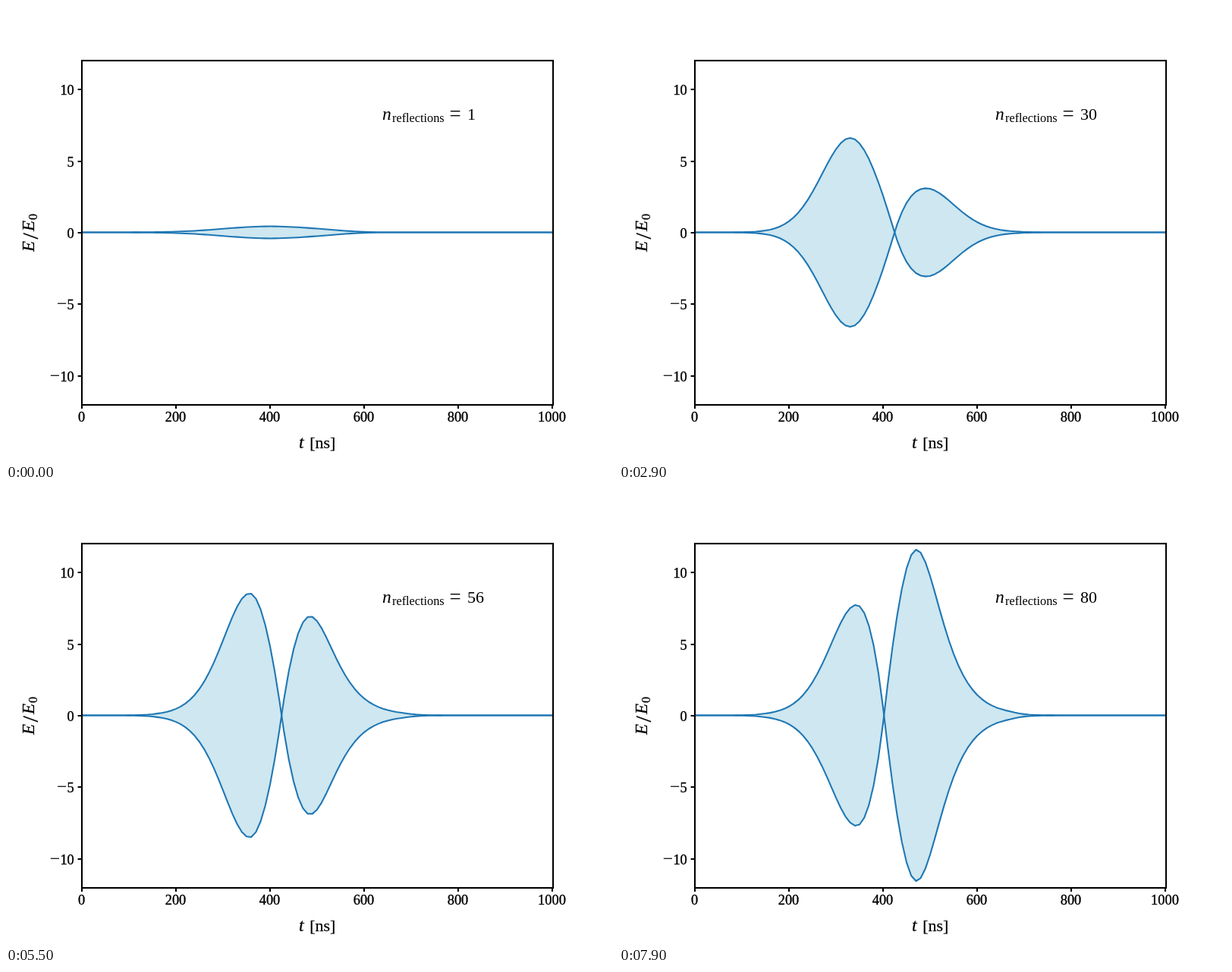
Animation, 800 px wide and 600 px high, one loop 8 s. Source, as an HTML page:

```html
<!DOCTYPE html>
<html lang="en">
<head>
<meta charset="utf-8">
<title>Pulse envelope by reflection</title>
<style>
  html, body { margin: 0; width: 100%; height: 100%; overflow: hidden; background: #fff; }
  svg { display: block; width: 800px; height: 600px; }
  text { font-family: "Liberation Serif", "Times New Roman", serif; font-size: 22px; fill: #000; }
  .tick { font-size: 18.4px; stroke: #000; stroke-width: .35px; }
  .label { stroke: #000; stroke-width: .25px; }
  .it { font-style: italic; }
  .curve { fill: none; stroke: #1f77b4; stroke-width: 2.08; stroke-linejoin: round; }
  .axis { fill: none; stroke: #000; stroke-width: 2.1; }
</style>
</head>
<body>
<svg viewBox="0 0 800 600">
  <path id="area" fill="#add8e6" fill-opacity=".6"/>
  <path id="upper" class="curve"/>
  <path id="lower" class="curve"/>
  <path id="ticks" class="axis"/>
  <rect class="axis" x="100" y="72" width="621" height="454"/>
  <g id="tickLabels"></g>
  <text class="label" y="582.6"><tspan class="it" x="386" font-size="24">t</tspan><tspan x="400.2">[ns]</tspan></text>
  <g class="label" transform="translate(37 324) rotate(-90)">
    <text class="it" x="0" y="0" style="font-size:23px">E</text>
    <text x="16.5" y="5" style="font-size:30px">/</text>
    <text class="it" x="27" y="0" style="font-size:23px">E</text>
    <text x="42" y="3.5" style="font-size:16px">0</text>
  </g>
  <text class="it" x="496" y="149.5" style="font-size:23.5px">n</text>
  <text x="509" y="153.2" style="font-size:16.3px">reflections</text>
  <text x="584.6" y="151.4" style="font-size:27px">=</text>
  <text id="count" x="608" y="149.5">1</text>
</svg>
<script>
const STEP = 100, COUNT = 80;
const px = t => 100 + 0.62 * t;
const py = e => 298.5 - 18.875 * e;
const mix = (a, b, f) => a + (b - a) * f;
const $ = id => document.getElementById(id);

// Energy passes back and forth between the two lobes
const KEYS = [
  { n: 1,  h1: 0.42, zero: 640,   h2: 0 },
  { n: 14, h1: 5.57, zero: 461,   h2: 1.63 },
  { n: 20, h1: 7.3,  zero: 440,   h2: 2.6 },
  { n: 30, h1: 6.6,  zero: 424.5, h2: 3.08 },
  { n: 40, h1: 5.93, zero: 397,   h2: 7.34 },
  { n: 56, h1: 8.53, zero: 424.5, h2: 6.92 },
  { n: 70, h1: 7.7,  zero: 403,   h2: 10.8 },
  { n: 80, h1: 7.72, zero: 402,   h2: 11.58 }
];

// Cubic from a flat peak down to the crossing
function inner(d, length, height, slope) {
  const u = d / length, u2 = u * u, u3 = u2 * u;
  return height * (1 - 3 * u2 + 2 * u3) + slope * length * (u2 - u3);
}

// Returns E(t) after n reflections
function pulse(n) {
  const i = Math.max(1, KEYS.findIndex(k => k.n >= n));
  const a = KEYS[i - 1], b = KEYS[i];
  const f = (n - a.n) / (b.n - a.n);
  const [h1, zero, h2] = ["h1", "zero", "h2"].map(k => mix(a[k], b[k], f));

  const fresh = Math.exp((1 - n) / 4);              // broad single pulse at first
  const sharp = 1 / (1 + Math.exp((33 - n) / 5));   // lobes narrow later
  const gap = mix(178, 128, sharp) * (1 + 0.85 * fresh);
  const c1 = zero - gap * (0.28 + 0.45 * h1 / (h1 + h2));
  const c2 = c1 + gap;
  const slope = 3.85 * Math.sqrt(h1 * h2) / gap;

  // Gaussian flank that widens away from the peak
  const tail = (d, early, late, spread) => {
    const w = mix(early, late + spread * Math.min(d, 200), sharp) * (1 + 0.55 * fresh);
    return Math.exp(-d * d / (2 * w * w));
  };

  return t => t <= c1 ? h1 * tail(c1 - t, 63, 53, 0.075)
    : t <= zero ? inner(t - c1, zero - c1, h1, slope)
    : t <= c2 ? -inner(c2 - t, c2 - zero, h2, slope)
    : -h2 * tail(t - c2, 66, 45, 0.14);
}

function addTick(text, x, y, anchor) {
  const el = document.createElementNS("http://www.w3.org/2000/svg", "text");
  el.setAttribute("class", "tick");
  el.setAttribute("x", x);
  el.setAttribute("y", y);
  el.setAttribute("text-anchor", anchor);
  el.innerHTML = text.replace("-", '<tspan font-size="24" stroke="none">\u2212</tspan>');
  $("tickLabels").append(el);
}

let marks = "";
for (let t = 0; t <= 1000; t += 200) {
  marks += `M${px(t)} 526v5`;
  addTick(String(t), px(t) - 0.5, 548, "middle");
}
for (let e = -10; e <= 10; e += 5) {
  const y = Math.ceil(py(e));
  marks += `M100 ${y}h-5.4`;
  addTick(String(e), 89.8, y + 6.5, "end");
}
$("ticks").setAttribute("d", marks);

function draw(n) {
  const field = pulse(n), top = [], bottom = [];
  for (let t = 0; t <= 1000; t += 10) {
    const e = field(t), x = px(t).toFixed(1);
    top.push(x + " " + py(e).toFixed(2));
    bottom.push(x + " " + py(-e).toFixed(2));
  }
  $("upper").setAttribute("d", "M" + top.join("L"));
  $("lower").setAttribute("d", "M" + bottom.join("L"));
  $("area").setAttribute("d", "M" + top.concat(bottom.reverse()).join("L") + "Z");
  $("count").textContent = n;
}

const start = performance.now();
let shown = 0;
function frame() {
  const n = 1 + Math.floor((performance.now() - start) / STEP) % COUNT;
  if (n !== shown) draw(shown = n);
  requestAnimationFrame(frame);
}
frame();
</script>
</body>
</html>
```
